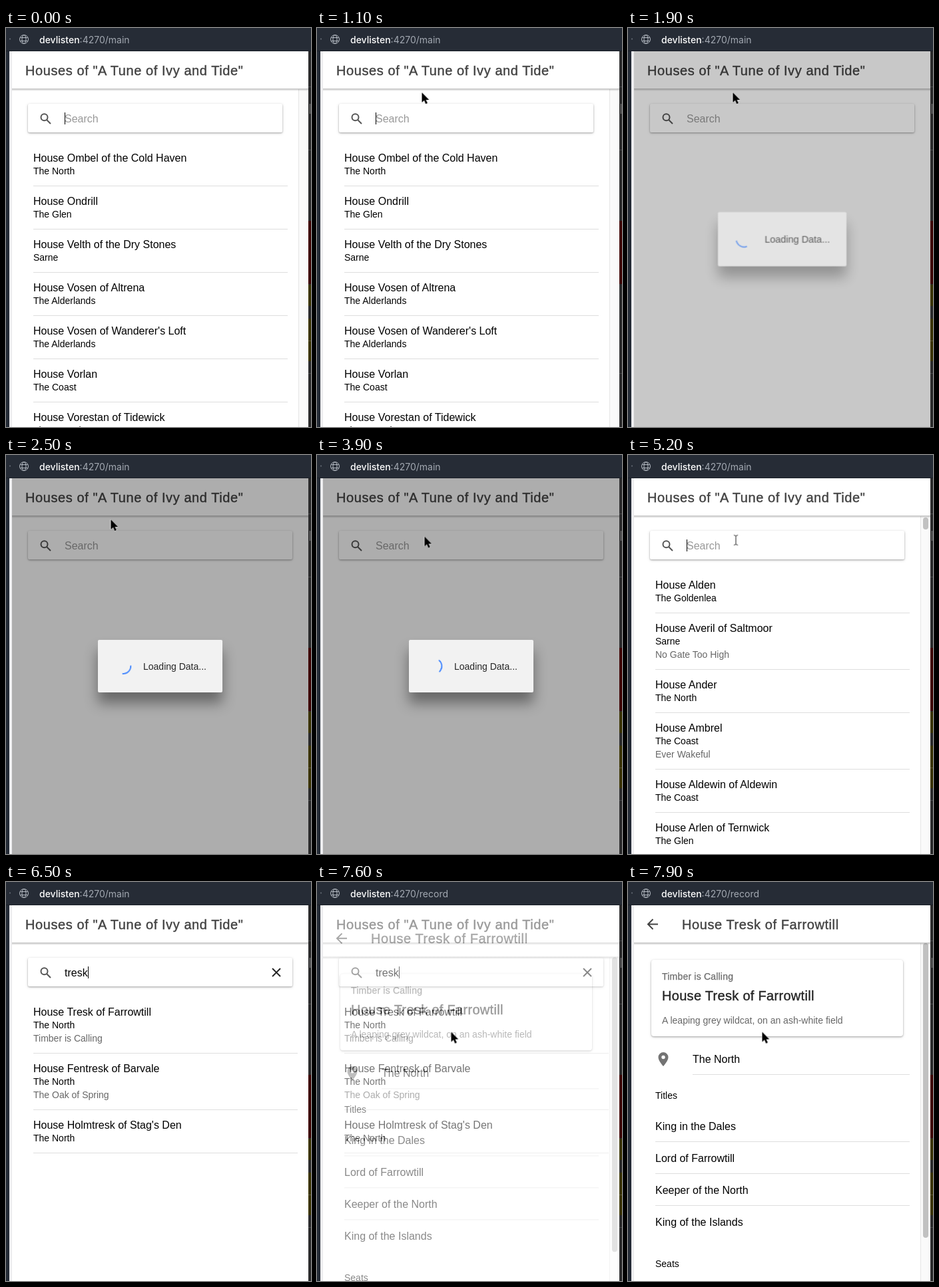
Animation of 458x600 px, one loop 8000 ms. Source, as an HTML page:

```html
<!DOCTYPE html>
<html lang="en">
<head>
<meta charset="utf-8">
<title>House list</title>
<style>
  html, body { margin: 0; width: 100%; height: 100%; overflow: hidden; background: #fff; }
  svg { display: block; width: 458px; height: 600px; }
  text { font: 16px "Liberation Sans", Arial, sans-serif; fill: #000; white-space: pre; }
  .small { font-size: 14px; }
  .muted { fill: #666; }
  .hint { fill: #999; }
  .title { font-size: 20px; letter-spacing: .58px; fill: #424242; stroke: #424242; stroke-width: .4px; }
  .name { font-size: 20px; letter-spacing: .3px; fill: #262626; stroke: #262626; stroke-width: .4px; }
  .motto { font-size: 14px; letter-spacing: .2px; fill: #6c6c6c; stroke: #6c6c6c; stroke-width: .25px; }
  .url { font: 14px Inter, "Liberation Sans", sans-serif; fill: #a3a9b2; }
  .host { fill: #fff; font-weight: 500; }
  .line { fill: #dedede; }
  .raised { fill: #fff; filter: drop-shadow(0 1px 1px rgba(0,0,0,.28)) drop-shadow(0 1px 2px rgba(0,0,0,.14)); }
  .modal { fill: #f2f2f2; filter: drop-shadow(0 16px 10px rgba(0,0,0,.4)); }
  .stroke { fill: none; stroke: #555; stroke-width: 2; }
</style>
</head>
<body>
<svg id="stage" viewBox="0 0 458 600"></svg>
<script>
const LOOP = 8000;
const rules = [];

// Builds a looping animation from [ms, declarations] pairs.
function anim(easing, frames) {
  const name = 'a' + rules.length;
  const body = frames.map(([ms, css]) => `${ms / LOOP * 100}%{${css}}`).join('');
  rules.push(`@keyframes ${name}{${body}}`);
  return `style="animation:${name} ${LOOP}ms ${easing} infinite"`;
}

// Visible only during the given [from, to) spans.
function show(...spans) {
  const frames = spans[0][0] ? [[0, 'opacity:0']] : [];
  for (const [from, to] of spans) frames.push([from, 'opacity:1'], [to, 'opacity:0']);
  return anim('step-end', frames);
}

const rect = (x, y, w, h, attrs = '') => `<rect x="${x}" y="${y}" width="${w}" height="${h}" ${attrs}/>`;
const text = (x, y, str, cls = '', attrs = '') => `<text x="${x}" y="${y}" class="${cls}" ${attrs}>${str}</text>`;
const group = (attrs, ...parts) => `<g ${attrs}>${parts.join('')}</g>`;
const fill = color => `fill="${color}"`;
const shift = (x, y) => `transform:translate(${x}px,${y}px)`;

function rows(list, right) {
  let y = 175;
  return list.map(([name, region, motto]) => {
    const height = motto ? 85 : 65;
    const row = text(41, y + 26, name) + text(41, y + 45, region, 'small') +
      (motto ? text(41, y + 65, motto, 'small muted') : '') +
      rect(41, y + height - 3, right - 41, 1, 'class="line"');
    y += height;
    return row;
  }).join('');
}

const header = rect(9, 35, 445, 56, fill('#fff')) + rect(9, 91, 445, 4, fill('url(#shade)'));
const track = rect(439, 92, 15, 548, fill('#fafafa')) + rect(439, 92, 1, 548, fill('#e6e6e6'));
const thumb = (y, h) => rect(443, y, 8, h, 'rx="4" fill="#c1c1c1"');
const cross = x => `<path class="stroke" style="stroke:#222;stroke-width:1.8" d="M${x - 6} 130l12 12m0-12l-12 12"/>`;
const caret = (x, ...spans) => rect(x, 127, 1, 18, show(...spans));

const scrolled = [
  ['House Ombel of the Cold Haven', 'The North'],
  ['House Ondrill', 'The Glen'],
  ['House Velth of the Dry Stones', 'Sarne'],
  ['House Vosen of Altrena', 'The Alderlands'],
  ["House Vosen of Wanderer's Loft", 'The Alderlands'],
  ['House Vorlan', 'The Coast'],
  ['House Vorestan of Tidewick', 'The Crownlea']
];
const fresh = [
  ['House Alden', 'The Goldenlea'],
  ['House Averil of Saltmoor', 'Sarne', 'No Gate Too High'],
  ['House Ander', 'The North'],
  ['House Ambrel', 'The Coast', 'Ever Wakeful'],
  ['House Aldewin of Aldewin', 'The Coast'],
  ['House Arlen of Ternwick', 'The Glen']
];
const found = [
  ['House Tresk of Farrowtill', 'The North', 'Timber is Calling'],
  ['House Fentresk of Barvale', 'The North', 'The Oak of Spring'],
  ["House Holmtresk of Stag's Den", 'The North']
];

// Typing: each key press replaces the field text and moves the caret.
const query = 'tresk';
const presses = [5600, 5700, 5900, 6000, 6200, LOOP];
const stops = [92, 97, 106, 114, 123];
const typed = [...query].map((_, i) => {
  const span = [presses[i], presses[i + 1]];
  const blink = i < 4 ? [span] : [[6200, 6700], [7200, 7700]];
  return text(88, 142, query.slice(0, i + 1), '', show(span)) + caret(stops[i], ...blink);
}).join('');

const narrow = [[0, 1600], [4090, 6490]];
const wide = [[1600, 4090], [6490, LOOP]];

const home = group('',
  rect(9, 35, 445, 565, fill('#fff')),
  group(show(...narrow), track, rect(33, 114, 382, 43, 'rx="2" class="raised"')),
  group(show(...wide), rect(33, 114, 397, 43, 'rx="2" class="raised"')),
  group(show([4090, 6490]), thumb(94, 18)),
  group(show([0, 1600]), rows(scrolled, 423)),
  group(show([4180, 6490]), rows(fresh, 423)),
  group(show([6490, LOOP]), rows(found, 438)),
  '<circle class="stroke" cx="57.5" cy="134.3" r="5"/><path class="stroke" d="M61 138l6 6"/>',
  text(88, 142, 'Search', 'hint', show([0, 5600])),
  caret(88, [0, 300], [800, 1600], [4180, 4700], [5200, 5600]),
  typed,
  group(show([5600, 6490]), cross(391)),
  group(show([6490, LOOP]), cross(406)),
  header,
  text(29, 71, 'Houses of "A Tune of Ivy and Tide"', 'title'));

const dim = anim('ease-in-out', [[0, 'opacity:0'], [1780, 'opacity:0'], [1980, 'opacity:.32'],
  [3936, 'opacity:.32'], [4136, 'opacity:0'], [LOOP, 'opacity:0']]);
const pop = (opacity, scale) => `opacity:${opacity};transform:scale(${scale});transform-origin:231.5px 317.5px`;
const modal = anim('ease-in-out', [[0, pop(0, 1.1)], [1780, pop(0, 1.1)], [1980, pop(1, 1)],
  [3936, pop(1, 1)], [4136, pop(0, .9)], [LOOP, pop(0, .9)]]);
const turn = deg => `transform:rotate(${deg}deg);transform-origin:176px 317.5px`;
const spin = anim('linear', [[0, turn(-125)], [LOOP, turn(3715)]]);

const loading = rect(9, 35, 445, 565, dim) + group(modal,
  rect(138, 278, 187, 79, 'rx="2" class="modal"'),
  `<circle cx="176" cy="317.5" r="11.4" fill="none" stroke="#3880ff" stroke-width="1.75" stroke-dasharray="20.1 60" ${spin}/>`,
  text(206, 323, 'Loading Data...', 'small', 'style="fill:#262626"'));

const titles = ['King in the Dales', 'Lord of Farrowtill', 'Keeper of the North', 'King of the Islands'];
const enter = anim('cubic-bezier(.36,.66,.04,1)', [
  [0, 'opacity:0;' + shift(0, 40)], [7550, 'opacity:0;' + shift(0, 40)],
  [7830, 'opacity:1;' + shift(0, 0)], [LOOP, 'opacity:1;' + shift(0, 0)]]);

const detail = group(enter,
  rect(9, 35, 445, 605, fill('#fff')),
  track, thumb(92, 443), header,
  '<path class="stroke" style="stroke:#424242" d="M45 63.5H30.5M37.5 56l-7.5 7.5 7.5 7.5"/>',
  text(81, 71, 'House Tresk of Farrowtill', 'title'),
  rect(35, 117, 378, 115, 'rx="4" class="raised"'),
  text(51, 147, 'Timber is Calling', 'motto'),
  text(51, 178, 'House Tresk of Farrowtill', 'name'),
  text(51, 213, 'A leaping grey wildcat, on an ash-white field', 'small muted'),
  '<path fill="#737373" fill-rule="evenodd" d="M53 256a7.5 7.5 0 0 0-7.5 7.5c0 5.6 7.5 13.5 7.5 13.5s7.5-7.900 7.500-13.500A7.500 7.500 0 0 0 53 256zm0 4.800a2.700 2.700 0 1 1 0 5.400a2.700 2.700 0 0 1 0-5.400z"/>',
  text(97, 272, 'The North'),
  rect(97, 289, 326, 1, 'class="line"'),
  text(41, 326, 'Titles', 'small'),
  titles.map((title, i) => text(41, 373 + i * 48, title) +
    (i < 3 ? rect(41, 390 + i * 48, 382, 1, 'class="line"') : '')).join(''),
  text(41, 579, 'Seats', 'small'));

const url = (path, span) => text(50, 23, `<tspan class="host">devlisten</tspan>:4270/${path}`, 'url', show(span));
const frame = group('',
  rect(0, 0, 458, 35, fill('#262c36')), rect(0, 34, 458, 1, fill('#1b2028')),
  rect(0, 35, 5, 565, fill('#242b36')), rect(5, 35, 4, 565, fill('#ededef')),
  '<circle cx="6" cy="16.500" r="1" fill="#6b727c"/>',
  '<path fill="none" stroke="#b4bac2" d="M20.500 17a6.500 6.500 0 1 0 13 0a6.500 6.500 0 1 0-13 0zM24 17a3 6.500 0 1 0 6 0a3 6.500 0 1 0-6 0zM21.500 14.500h11M21.500 19.500h11"/>',
  url('main', [0, 7550]), url('record', [7550, LOOP]),
  rect(454, 35, 4, 565, fill('#2a2a2b')),
  [88, 183, 519].map(y => rect(454, y, 4, 1, fill('#48494b'))).join(''),
  rect(456, 114, 1, 15, fill('#8a8a8a')),
  rect(454, 290, 4, 95, fill('#3d0000')),
  group(show([0, 1100], [1600, LOOP]),
    rect(454, 386, 4, 32, fill('#3a3300')), rect(454, 437, 4, 64, fill('#3a3300')),
    rect(454, 470, 4, 1, fill('#5a5433'))));

const path = anim('ease-in-out', [
  [0, shift(249, 16)], [100, shift(249, 16) + ';animation-timing-function:ease-out'],
  [600, shift(157.5, 97)], [2900, shift(157.5, 97)],
  [3200, shift(161.5, 122.5)], [4380, shift(161.5, 122.5)],
  [4500, shift(161.5, 126.5)], [6850, shift(161.5, 126.5) + ';animation-timing-function:ease-in'],
  [7130, shift(210, 195) + ';animation-timing-function:ease-out'],
  [7300, shift(201.5, 225.5)], [LOOP, shift(201.5, 225.5)]]);

const pointer = group(path,
  group(show([90, 4180], [7050, LOOP]),
    '<path d="M0 0v15l3.400-3.200 2.400 5.400 2.600-1.100-2.300-5.200h4.700z" stroke="#fff" stroke-width="1" paint-order="stroke"/>'),
  group(show([4180, 5590], [6890, 7050]),
    '<path fill="none" stroke="#222" d="M-2.500-6q3 0 3 2.500v10q0 2.500-3 2.500M3.500-6q-3 0-3 2.500M.5 6.500q0 2.500 3 2.500"/>'));

document.getElementById('stage').innerHTML =
  '<defs><clipPath id="page"><rect x="9" y="35" width="445" height="565"/></clipPath>' +
  '<linearGradient id="shade" x2="0" y2="1"><stop stop-opacity=".26"/><stop offset="1" stop-opacity="0"/></linearGradient></defs>' +
  frame + group('clip-path="url(#page)"', home, loading, detail) + pointer;

const sheet = document.createElement('style');
sheet.textContent = rules.join('\n');
document.head.append(sheet);
</script>
</body>
</html>
```
